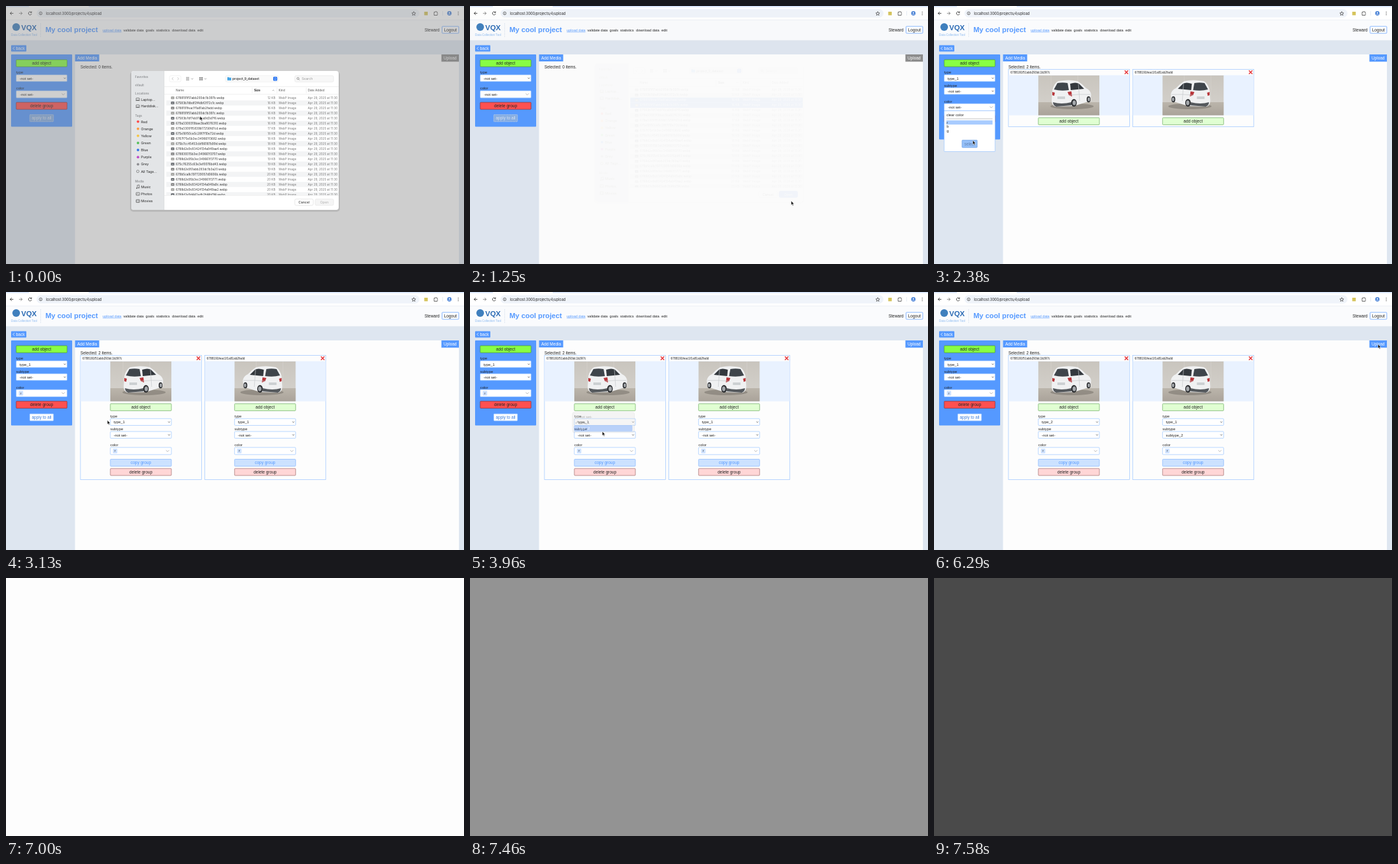
Recreate the animation shown at these times as an HTML page. Size 720 by 405 pixels, loop 7.62 s.

```html
<!DOCTYPE html>
<html lang="en">
<head>
<meta charset="utf-8">
<title>Upload walkthrough</title>
<style>
html, body { margin: 0; width: 100%; height: 100%; overflow: hidden; background: #fdfdfd; }
svg { display: block; width: 100vw; height: 100vh; }
text { font-family: "Liberation Sans", Arial, sans-serif; white-space: pre; }
.ui text { font-family: Inter, Roboto, sans-serif; }
</style>
</head>
<body>
<svg id="stage" viewBox="0 0 720 405"></svg>
<script>
const LOOP = 7620;
const BLUE = '#5599ff', INK = '#222', PALE = '#99c4ff';
const stage = document.getElementById('stage');

const clamp = v => Math.max(0, Math.min(1, v));
const ramp = (t, from, to) => clamp((t - from) / (to - from));
const ease = p => p * p * (3 - 2 * p);
const during = (t, from, to) => t >= from && t < to;

const rect = (x, y, w, h, fill, more = '') =>
  `<rect x="${x}" y="${y}" width="${w}" height="${h}" fill="${fill}" ${more}/>`;
const boxed = (x, y, w, h, fill, stroke, r = 1, more = '') =>
  rect(x, y, w, h, fill, `stroke="${stroke}" stroke-width=".7" rx="${r}" ${more}`);
const text = (x, y, str, size = 6.5, fill = INK, more = '') =>
  `<text x="${x}" y="${y}" font-size="${size}" fill="${fill}" ${more}>${str}</text>`;
const mid = (x, y, str, size, fill, more = '') =>
  text(x, y, str, size, fill, `text-anchor="middle" ${more}`);
const line = (d, stroke = INK, w = .8, more = '') =>
  `<path d="${d}" fill="none" stroke="${stroke}" stroke-width="${w}" ${more}/>`;
const dot = (x, y, r, fill, more = '') => `<circle cx="${x}" cy="${y}" r="${r}" fill="${fill}" ${more}/>`;
const group = (content, attrs) => `<g ${attrs}>${content}</g>`;
const button = (x, y, w, label, fill, stroke, ink = INK, more = '') =>
  boxed(x, y, w, 11, fill, stroke, 1, more) + mid(x + w / 2, y + 7.8, label, 6.5, ink);

// --- browser and page header ---
const chrome = group(
  rect(0, 0, 720, 22, '#fff') + rect(0, 0, 720, 1.6, '#d6e4fa') + rect(36, 0, 94, 2, '#fff') +
  rect(48, 5, 602, 13, '#f0f4fa', 'rx="6.5"') +
  line('M11.5 11.5H6.5M9 9L6.5 11.5L9 14') +
  line('M20.5 11.5H25.5M23 9L25.5 11.5L23 14', '#777') +
  line('M39.8 10A2.5 2.5 0 1 0 40.2 12.2M40.2 8.5V10.4H38.2') +
  dot(54.5, 11.5, 2.3, 'none', 'stroke="#444" stroke-width=".7"') + line('M54.5 11.2V13M54.5 9.9V10.5', '#444', .7) +
  text(63, 13.6, 'localhost:3000/projects/4/upload', 5.5) +
  line('M641 8.7L641.9 10.8L644.1 11L642.4 12.4L643 14.6L641 13.4L639 14.6L639.6 12.4L637.9 11L640.1 10.8Z', '#333', .7) +
  rect(657.5, 9, 5.5, 5.5, '#d5c45c') +
  line('M673 9.5H675A1 1 0 0 1 677 9.5H678V11.5A1 1 0 0 1 678 13.2V14.5H673Z', '#444') +
  line('M686.5 8V15', '#d5dfee', .6) +
  dot(697, 11.5, 3.4, '#4b83d6') + dot(697, 10.6, 1.1, '#e7f0ff') + line('M695.2 13.6Q697 11.6 698.8 13.6', '#e7f0ff') +
  [9.3, 11.5, 13.7].map(y => dot(711, y, .6, '#333')).join(''), 'class="ui"');

const nav = [[184.5, 'validate data'], [219.5, 'goals'], [236, 'statistics'], [261, 'download data'], [301, 'edit']];
const header =
  rect(0, 22, 720, 32, '#fafbfd') + line('M0 22H720M0 54H720', '#dfe6ef', .6) +
  dot(16, 33, 6, '#3f7fbd') + text(24, 38, 'VQX', 11.5, '#2d6cb5', 'font-weight="bold"') +
  text(8, 47, 'Data Collection Tool', 4.6, '#8ab8ef') +
  line('M54.5 27V49', '#c3d3e6', .6, 'stroke-dasharray="1.5 1"') +
  text(62, 41.4, 'My cool project', 11.25, BLUE, 'font-weight="bold"') +
  text(152, 39.7, 'upload data', 5.65, BLUE, 'text-decoration="underline"') +
  nav.map(([x, s]) => text(x, 39.7, s, 5.65)).join('') +
  text(658, 39.8, 'Steward', 6.45) +
  boxed(685.5, 32, 26.3, 10.8, '#fff', BLUE) + mid(698.7, 39.8, 'Logout');

const pageFrame =
  rect(0, 0, 720, 405, '#dee6f0') + chrome + header +
  rect(8, 61.5, 24, 10, BLUE, 'rx="1"') + line('M13.3 64.2L11 66.5L13.3 68.8', '#fff') + text(15.7, 68.8, 'back', 6.5, '#fff') +
  rect(108.5, 76, 603.5, 329, '#fdfdfd') +
  rect(108.5, 76, 38, 11, BLUE) + text(112, 83.9, 'Add Media', 6.5, '#fff');

// --- form pieces shared by the side panel and the cards ---
const select = (x, y, w, value) =>
  boxed(x, y, w, 10.6, '#fff', PALE) + text(x + 5.2, y + 7.5, value, 5.85) +
  line(`M${x + w - 5} ${y + 4.6}l1.4 1.5l1.4 -1.5`, '#333', .7);

const colorSelect = (x, y, w, picked) =>
  boxed(x, y, w, 11.2, '#fff', PALE) +
  (picked ? rect(x + 4, y + 2, 7, 7.2, '#cfe2ff', 'rx="1"') + text(x + 6.6, y + 7.4, 'r', 5.2)
          : text(x + 6, y + 7.6, '-not set-', 5.85)) +
  line(`M${x + w - 8.4} ${y + 4.3}l2.4 2.4l2.4 -2.4`, '#888', .6);

function sidePanel(s) {
  const shift = s.sideType ? 20.2 : 0;
  let out = rect(8, 76, 96, 113.4 + shift, BLUE, 'rx="1"') +
    button(16, 84.3, 80, 'add object', '#88ff44', '#4a9a30') +
    text(16, 106, 'type', 5.75) + select(16, 108, 80, s.sideType || '-not set-');
  if (s.sideType) out += text(16, 126.6, 'subtype', 5.75) + select(16, 128.2, 80, '-not set-');
  out += text(16, 131.3 + shift, 'color', 5.75) + colorSelect(16, 133 + shift, 80, s.sideColor) +
    button(16, 151.2 + shift, 80, 'delete group', '#ff5050', '#8e3030');
  return out + (s.sideColor
    ? button(37.3, 171 + shift, 37.4, 'apply to all', '#fff', PALE, '#3f7fdc')
    : button(37.3, 170.6 + shift, 37.4, 'apply to all', '#86aee4', '#d6dde8', '#d9e3f2', 'stroke-dasharray="1.5 1"'));
}

const colorMenu = picked =>
  boxed(16, 164.5, 80, 64, '#fff', PALE, .5) + text(19.5, 173, 'clear color', 5.9) + line('M19.5 177H92', '#888', .5) +
  (picked ? rect(19.5, 179.5, 72.5, 6.6, '#a9ccff') : '') +
  ['r', 'b', 'g'].map((c, i) => text(20, 184.6 + i * 6.7, c, 5.6)).join('') +
  boxed(44, 210.5, 24, 11.7, '#94bff8', '#72a4e6') + mid(56, 218.6, 'select', 6.3, '#6485b4');

// --- photo stand-in: a white hatchback in a plain room ---
const car =
  rect(0, 0, 96, 62.5, 'url(#wall)') + rect(0, 42, 96, 20.5, 'url(#floor)') +
  line('M20 0V40M62 0V20', '#d9d6d1', .5) +
  `<ellipse cx="53" cy="48.5" rx="34" ry="4.5" fill="#77716a" opacity=".55"/>
   <path d="M22 23Q25 12 31 9Q48 6 62 9Q70 14 75 20Q82 23 83 30L82 40L56 48L27 49Q21 47 21 40Z" fill="#f0f1f2"/>
   <path d="M24.5 22L30 12Q38 10.5 46 12L48 23Q35 25 24.5 22Z" fill="#3f454b"/>
   <path d="M51 23L50 13Q59 10 64 13L72 21Z" fill="#34393e"/>
   <path d="M22 26L26 27L25 32L22 31ZM46 26L52 25L53 33L48 31Z" fill="#b8363b"/>
   <path d="M23 42Q36 46 52 42L52 47L28 49Q23 47 23 42Z" fill="#55595d"/>
   <path d="M48 31Q65 29 82 30M63 13L65 40" fill="none" stroke="#c5c8ca" stroke-width=".7"/>` +
  rect(30, 33, 12, 4, '#ccd0d2') +
  [[56, 43, 4.4, 6], [79, 37.5, 3, 4.8]].map(([x, y, rx, ry]) =>
    `<ellipse cx="${x}" cy="${y}" rx="${rx}" ry="${ry}" fill="#2b2d30"/>
     <ellipse cx="${x + .4}" cy="${y}" rx="${rx * .6}" ry="${ry * .62}" fill="#a4a8ac"/>`).join('');

const defs = `<defs>
  <linearGradient id="wall" x2="0" y2="1"><stop stop-color="#c9c5be"/><stop offset="1" stop-color="#d6d3ce"/></linearGradient>
  <linearGradient id="floor" x2="0" y2="1"><stop stop-color="#bbb5ab"/><stop offset="1" stop-color="#aaa39a"/></linearGradient>
  <clipPath id="dialogClip"><rect x="197" y="102" width="326" height="218" rx="4"/></clipPath>
  <clipPath id="rowClip"><rect x="248" y="139" width="275" height="158"/></clipPath></defs>`;

function card(dx, id, mirrored, s, type, subtype) {
  let out = boxed(117, 99.5, 190.5, s.applied ? 195 : 90, '#fdfdfd', PALE, 0) +
    rect(117.4, 108.6, 189.8, 63, '#e9f2ff') + text(120.3, 106, id, 4.8) +
    line('M299.8 101.3l5.4 5.4M305.2 101.3l-5.4 5.4', '#e63538', 1.5) +
    group(car, `transform="translate(${mirrored ? 260 : 164} 109)${mirrored ? ' scale(-1 1)' : ''}"`) +
    button(164, 175.4, 96, 'add object', '#e0ffd2', '#69a95c');
  if (s.applied) {
    out += text(164, 197.2, 'type', 5.75) + select(164, 198.8, 96, type) +
      text(164, 217.3, 'subtype', 5.75) + select(164, 219, 96, subtype) +
      text(164, 242.2, 'color', 5.75) + colorSelect(164, 244, 96, true) +
      button(164, 262.5, 96, 'copy group', '#cce2ff', '#83b5ff', BLUE) +
      button(164, 277, 96, 'delete group', '#ffd6d6', '#a06a6a');
  }
  return group(out, `transform="translate(${dx} 0)"`);
}

// Native menu whose checked item lies over the select at (x, y).
function menu(x, y, w, items, checked, hover, alpha) {
  const step = 9.3, top = y - checked * step - .8;
  return group(
    rect(x - 3.2, top + .8, w + 2, items.length * step + 4, '#000', 'rx="3" opacity=".12"') +
    boxed(x - 3, top, w + 1.6, items.length * step + 3, '#e3e3e3', '#c4c4c4', 3) +
    items.map((item, i) => {
      const on = i === hover, base = top + 8.8 + i * step, ink = on ? '#fff' : INK;
      return (on ? rect(x - .7, base - 6.6, w - 4, 8.9, '#2f78f2', 'rx="1.5"') : '') +
        (i === checked ? line(`M${x + 1.6} ${base - 2}l1.2 1.7l2.3 -4`, ink, .8) : '') +
        text(x + 6.6, base, item, 5.85, ink);
    }).join(''), `opacity="${alpha}"`);
}

// --- file chooser ---
const files = `6788191f51abb293dc1b397b 67583b7dbdf2f4dbf2f72c1c 6788191feac1f1a81ab2fadd 6788191f51abb293dc1b397c
67583b7df7eb91dca9d3d7f6 679a3309319bae3ba8076310 679a33091f5839b17256fd7cd 675e16f50ce5c28f7f10e72d 6767f75e5b3ec349661f3682
675b7cc45453cbf86187b99d 6788d2e9c83424134a949aa4 678839315b3ec349661f3707 6788d2e95b3ec349661f3770 675c76255c63e3ef0076bd43
6788d2e951abb293dc1b3a20 679b5ca8c197729057d0606b 6788d2e95b3ec349661f3771 6788d2e9c83424134a949a9c 6788d2e9c83424134a949aa2
6788d2e9d442edb2bf4bf1f4`.split(/\s+/);
const sizes = [12, 16, 16, 16, 16, 16, 17, 18, 18, 18, 18, 19, 19, 19, 19, 20, 20, 20, 20, 20];
const tags = [['Red', '#ff4d4d'], ['Orange', '#ff9b3d'], ['Yellow', '#f5c646'], ['Green', '#57c05b'],
  ['Blue', '#3577e8'], ['Purple', '#c04ac8'], ['Grey', '#8e8e93']];

function fileRow(name, i, selected) {
  const y = 144.2 + i * 8, ink = selected ? '#fff' : '#333', soft = selected ? '#fff' : '#777';
  const tone = ['#666', '#8b8b86', '#454a50'][(i * 7 + 1) % 3];
  return (selected || i % 2 ? rect(252, y - 4, 271, 8, selected ? '#2f6fe0' : '#f3f4f5') : '') +
    rect(259.5, y - 1.9, 5, 3.8, tone) + rect(260.5, y - .4, 3, 1.2, '#ddd') +
    text(267, y + 1.7, name + '.webp', 4.7, ink) +
    text(423.5, y + 1.7, sizes[i] + ' KB', 4.7, soft, 'text-anchor="end"') +
    text(428.5, y + 1.7, 'WebP Image', 4.7, soft) + text(474.5, y + 1.7, 'Apr 29, 2025 at 11:30', 4.7, soft);
}

const placeIcon = y => boxed(204.6, y - 2, 5, 3.2, 'none', '#555', .5) + line(`M203.8 ${y + 2}h6.6`, '#555', .7);
const chooserSide =
  rect(197, 102, 51.5, 218, '#e3e5e7') + line('M248.5 102V320', '#d2d4d6', .6) +
  [['Favorites', 111.5], ['eVault', 124.5], ['Locations', 137], ['Tags', 172.3], ['Media', 275]]
    .map(([s, y]) => text(203, y + 1.7, s, 4.7, '#85878a', 'font-weight="500"')).join('') +
  [['Laptop…', 146.5], ['Harddisk…', 157.3]].map(([s, y]) => placeIcon(y) + text(212.3, y + 2, s, 5.4)).join('') +
  tags.map(([s, c], i) => dot(207.5, 181.5 + i * 11.15, 2, c) + text(212.3, 183.5 + i * 11.15, s, 5.4)).join('') +
  dot(207.2, 259.6, 2, 'none', 'stroke="#555" stroke-width=".6"') + text(212.3, 261.6, 'All Tags…', 5.4) +
  line('M206.3 286V281.4L209.3 280.8V285.4', '#555', .7) + dot(205.6, 286, .9, '#555') + dot(208.6, 285.4, .9, '#555') +
  boxed(204.6, 292.8, 5.4, 4.4, 'none', '#555', .5) + line('M205 296.5l1.6 -2l2.5 2', '#555', .5) +
  boxed(204.6, 304, 5.4, 4.4, 'none', '#555', .5) + line('M206 304v4.4M208.6 304v4.4', '#555', .5) +
  ['Music', 'Photos', 'Movies'].map((s, i) => text(212.3, 285.8 + i * 11.2, s, 5.4)).join('');

const chooserTop =
  line('M263 112l-2 2.2l2 2.2M269.5 112l2 2.2l-2 2.2', '#b4b4b4', .7) + boxed(257, 109.5, 18, 9.5, 'none', '#ececec', 2) +
  line('M283 112.2h5M283 114.2h5M283 116.2h5', '#666', .7) + line('M291.2 113.6l1.5 1.5l1.5 -1.5', '#666', .6) +
  [304, 307].map(x => rect(x, 111.8, 2.2, 2, '#777') + rect(x, 114.6, 2.2, 2, '#777')).join('') +
  line('M312 113.6l1.5 1.5l1.5 -1.5', '#666', .6) +
  boxed(345, 109.2, 83, 10, '#fafafa', '#eee', 2) +
  `<path d="M348 111.8h2.3l.8 .8h3v4.2h-6.1z" fill="#45a5e6"/>` + text(356, 116, 'project_9_dataset', 5, INK, 'font-weight="500"') +
  rect(420, 111, 6.4, 6.4, '#2f78f2', 'rx="1.5"') + line('M421.8 113.6l1.4 -1.3l1.4 1.3M421.8 114.9l1.4 1.3l1.4 -1.3', '#fff', .6) +
  boxed(454, 109.4, 61, 9.8, '#f7f7f7', '#e7e7e7', 2) + dot(459, 113.8, 1.6, 'none', 'stroke="#666" stroke-width=".6"') +
  line('M460.2 115l1.4 1.4', '#666', .6) + text(465, 116, 'Search', 5.2, '#999') +
  line('M248.5 126.6H523M248.5 138.4H523M248.5 297.4H523', '#dedede', .5) +
  line('M387 128V137M426 128V137M472 128V137', '#ddd', .5) +
  text(267, 134.2, 'Name', 4.7, '#555') + text(390, 134.2, 'Size', 4.7, INK, 'font-weight="bold"') +
  line('M418.8 133.2l1.4 -1.4l1.4 1.4', '#777', .6) +
  text(428.5, 134.2, 'Kind', 4.7, '#555') + text(474.5, 134.2, 'Date Added', 4.7, '#555');

function chooser(s, t) {
  const gone = ramp(t, 1010, 1262);
  const ready = s.picked.length > 0;
  const body = rect(197, 102, 326, 218, '#fff') + chooserSide + chooserTop +
    group(files.map((f, i) => fileRow(f, i, s.picked.includes(i))).join(''), 'clip-path="url(#rowClip)"') +
    boxed(454, 303, 29, 10, '#fff', '#ddd', 2.2) + mid(468.5, 310, 'Cancel', 5.3, INK) +
    boxed(486, 303, 29, 10, ready ? '#2f78f2' : '#f5f5f5', ready ? '#2f78f2' : '#e6e6e6', 2.2) +
    mid(500.5, 310, 'Open', 5.3, ready ? '#fff' : '#b0b0b0');
  return rect(0, 0, 720, 405, '#808080', `opacity="${.38 * (1 - gone)}"`) +
    group(rect(195, 103, 330, 220, '#000', 'rx="5" opacity=".1"') + group(body, 'clip-path="url(#dialogClip)"'),
      `class="ui" opacity="${1 - gone}" transform="translate(0 ${-13 * gone})"`);
}

// --- pointer: [time, x, y] stops joined by eased moves ---
const stops = [[0, 305, 173], [150, 305, 161], [280, 305, 161], [420, 306, 168], [540, 306, 168], [900, 503, 306],
  [1300, 505, 306], [1640, 62, 113], [1740, 62, 113], [1840, 60, 122], [1920, 60, 122], [2040, 64, 158], [2110, 64, 158],
  [2220, 42, 183], [2270, 42, 183], [2375, 61, 211], [2480, 61, 213], [2680, 58, 196], [2860, 58, 196],
  [3300, 209, 204], [3560, 209, 204], [3750, 208, 213], [3870, 208, 213], [3960, 208, 219], [4100, 209, 222],
  [4600, 421, 224], [4850, 421, 224], [5250, 422, 242], [5500, 422, 243], [6150, 698, 82], [7000, 698, 82]];

function pointer(t) {
  const next = Math.max(1, stops.findIndex(p => p[0] > t));
  const [a, b] = t >= 7000 ? [stops.at(-2), stops.at(-1)] : [stops[next - 1], stops[next]];
  const p = ease(ramp(t, a[0], b[0]));
  const x = a[1] + (b[1] - a[1]) * p, y = a[2] + (b[2] - a[2]) * p;
  return `<path transform="translate(${x} ${y})" d="M0 0V6.4L1.5 5.1L2.5 7.4L3.6 6.9L2.6 4.7H4.6Z" fill="#111" stroke="#fff" stroke-width=".5"/>`;
}

function render(t) {
  const s = {
    picked: t < 200 ? [] : t < 460 ? [2] : [2, 3],
    loaded: t >= 1400,
    sideType: t >= 1920 ? 'type_1' : '',
    sideColor: t >= 2430,
    applied: t >= 2790,
  };
  const types = ['-not set-', 'type_1', 'type_2'], subtypes = ['-not set-', 'subtype_1', 'subtype_2'];
  let out = defs + pageFrame +
    text(117, 98, `Selected: ${s.loaded ? 2 : 0} items.`, 6.35) +
    rect(684.5, 76, 27.5, 11.4, s.loaded ? BLUE : '#8c8c8c') + mid(698.2, 84, 'Upload', 6.5, '#fff') +
    sidePanel(s);
  if (s.loaded) {
    out += card(0, files[3], false, s, t >= 4000 ? 'type_2' : 'type_1', '-not set-') +
      card(195.3, files[2], true, s, 'type_1', t >= 5420 ? 'subtype_2' : '-not set-');
  }
  if (during(t, 1690, 1960)) out += menu(16, 108, 80, types, 0, t < 1790 ? 0 : 1, 1 - ramp(t, 1880, 1960));
  if (during(t, 2080, 2430)) out += colorMenu(t >= 2240);
  if (during(t, 3460, 4000)) out += menu(164, 198.8, 96, types, 1, t < 3660 ? 1 : 2, 1 - ramp(t, 3880, 4000));
  if (during(t, 4760, 5500)) out += menu(359.3, 219, 96, subtypes, 0, t < 5000 ? 0 : t < 5240 ? 1 : 2, 1 - ramp(t, 5390, 5500));
  if (t < 1262) out += chooser(s, t);
  out += pointer(t);

  const grey = 253 - 179 * ramp(t, 7290, 7580);
  const cover = ramp(t, 6480, 7000);
  if (cover) out += rect(0, 0, 720, 405, `rgb(${grey},${grey},${grey})`, `opacity="${cover}"`);
  stage.innerHTML = out;
}

const start = performance.now();
function tick() {
  render((performance.now() - start) % LOOP);
  requestAnimationFrame(tick);
}
tick();
</script>
</body>
</html>
```
